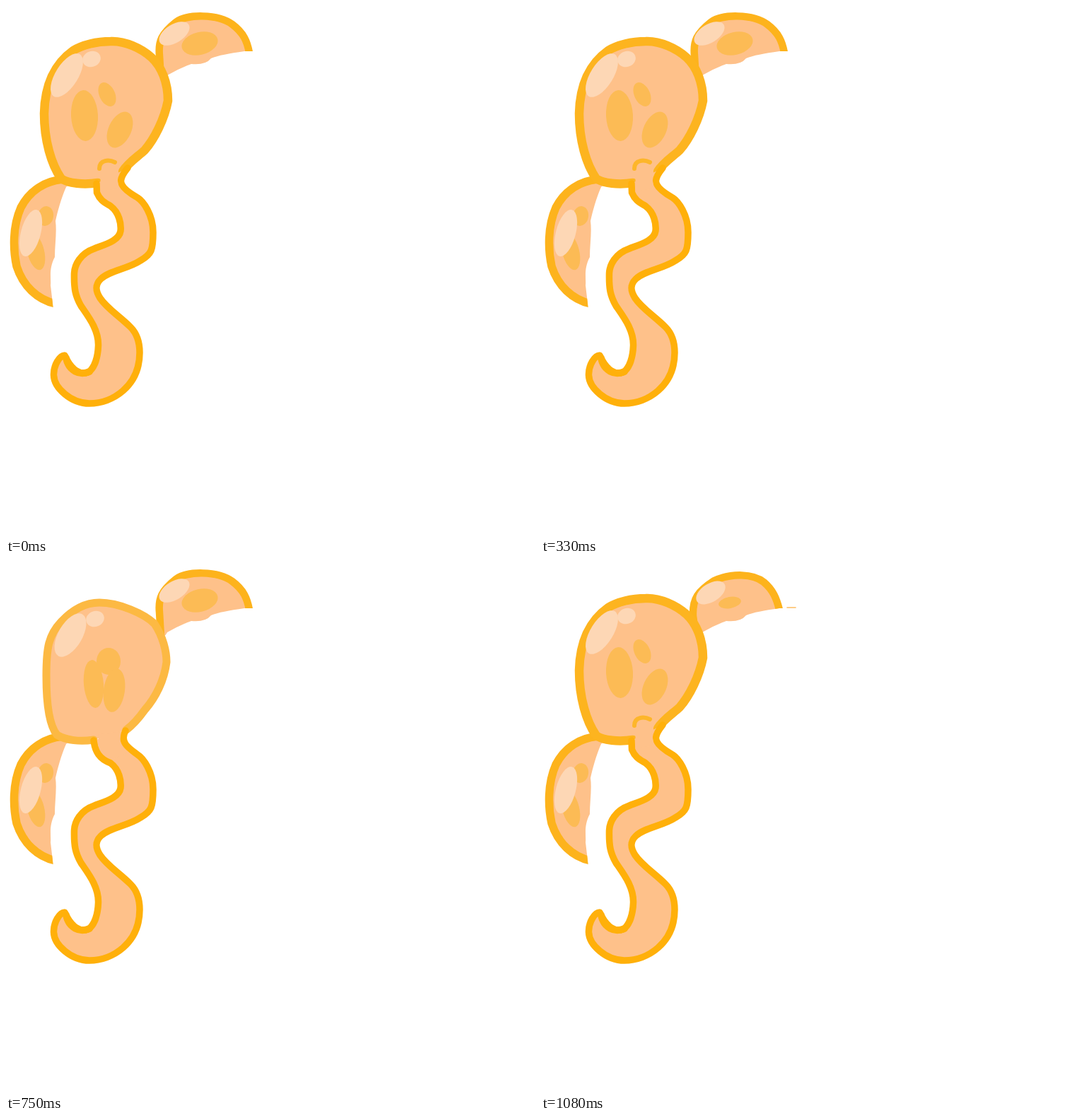
Write an HTML page that moves like this. It is 748 px wide and 748 px high and loops after 1160 ms.

```html
<!DOCTYPE html>
<html>
<head>
<meta charset="utf-8">
<style>
  html, body { margin: 0; width: 100%; height: 100%; overflow: hidden; background: #fff; }
  svg { display: block; width: 100vw; height: 100vh; }
  path { stroke-linecap: round; stroke-linejoin: round; }
</style>
</head>
<body>
<svg viewBox="0 0 748 748">
  <defs>
    <clipPath id="wingCut">
      <path d="M180 -10 H370 V64 L337 64 C315 67 300 70 290 74 Q282 84 262 82 Q245 88 228 98 L223 106 H180Z"/>
    </clipPath>
    <clipPath id="sacCut">
      <path d="M-10 200 H92 V250 L85 256 C78 272 73 290 70 304 C72 320 69 338 69 355 C60 372 64 385 63 395 L65 412 L69 445 H-10Z"/>
    </clipPath>
  </defs>
  <g id="sac" clip-path="url(#sacCut)"></g>
  <g id="wing" clip-path="url(#wingCut)"></g>
  <g id="head"></g>
</svg>
<script>
const FLESH = '#fec18a', SPOT = '#fcbb55', SHINE = '#fdd7b5';
const LOOP = 1160;

// Blends two paths, or two lists of ellipses, of the same structure.
const mix = (a, b, t) => a + (b - a) * t;
function mixPath(a, b, t) {
  const to = b.match(/-?[\d.]+/g);
  let i = 0;
  return a.replace(/-?[\d.]+/g, n => mix(+n, +to[i++], t).toFixed(2));
}
const blend = (a, b, t) => ({
  d: mixPath(a.d, b.d, t),
  spots: a.spots.map((e, i) => e.map((n, j) => mix(n, b.spots[i][j], t))),
  shines: a.shines.map((e, i) => e.map((n, j) => mix(n, b.shines[i][j], t)))
});

const path = (d, fill, stroke = 'none', width = 0) =>
  `<path d="${d}" fill="${fill}" stroke="${stroke}" stroke-width="${width}"/>`;
const ellipse = fill => ([x, y, rx, ry, turn]) =>
  `<ellipse rx="${rx}" ry="${ry}" fill="${fill}" transform="translate(${x} ${y}) rotate(${turn})"/>`;
const marks = p => p.spots.map(ellipse(SPOT)).join('') + p.shines.map(ellipse(SHINE)).join('');

// Left sac
const sacRest = {
  d: 'M84 245 C55 246 33 262 21 285 C9 312 10 345 15 368 C24 396 44 415 70 421 L110 421 L110 245',
  spots: [[56, 297, 11, 14, 10], [42, 347, 12, 27, -14]],
  shines: [[35, 321, 14, 34, 15]]
};
const sacFull = {
  d: 'M84 239 C50 238 28 254 17 276 C6 300 6 330 9 356 C13 395 22 417 74 437 L110 437 L110 239',
  spots: [[49, 281, 11, 25, 25], [36, 355, 10, 27, -5]],
  shines: [[28, 318, 15, 33, 14]]
};
const drawSac = p => path(p.d, FLESH, '#fdb31c', 11.5) + marks(p);

// Upper right wing
const wingRest = {
  d: 'M219 104 L217 70 C215 50 220 39 240 23 C255 11 300 11 320 26 C336 38 341 50 344 66',
  spots: [[274, 53, 26, 16, -14]],
  shines: [[238, 39, 24, 13, -32]]
};
const wingFull = {
  d: 'M219 104 L215 70 C212 46 216 32 238 15 C256 2 308 2 328 18 C344 32 350 46 354 66',
  spots: [[280, 49, 30, 18, -14]],
  shines: [[236, 34, 25, 14, -32]]
};
const wingSmall = {
  d: 'M219 104 L215 75 C214 50 222 40 245 25 C270 14 300 15 315 27 C328 38 333 50 337 66',
  spots: [[267, 56, 16, 8, -10]],
  shines: [[240, 42, 23, 13, -32]]
};
const drawWing = p => path(p.d, FLESH, '#fdb31c', 10.5) + marks(p);
const speck = path('M348 63 H360', 'none', '#fdbd62', 1.6);

// Head with the tail below it
const tail = 'C160 292 163 308 162 318 C160 332 140 337 125 343 C105 350 97 366 96.5 378 ' +
  'C96 400 98 410 106 424 C117 440 131 458 130.5 480 C130 495 126 512 116 518 ' +
  'C104 522 92 514 83 494 C76 494 67 508 67.5 522 C68 540 92 562 118 562 ' +
  'C150 562 189 538 189 490 C189 475 184 462 176 454 C160 438 143 428 133 413 ' +
  'C126 402 126 394 134 386 C146 374 172 372 190 360 C206 351 208 345 208 320 ' +
  'C208 295 194 276 186 271 ';
const hook = path('M85 498 C89 516 104 523 118 517', 'none', '#ffb00a', 10);
const openNeck = path('M131 242 L130 258 L136 268 L150 278 L172 268 L160 257 L163 238Z', FLESH);
const cappedNeck =
  path('M133.5 262 V229 Q138 221 146 221 Q155 221 160 226 L157.5 245 L160 258Z', FLESH) +
  path('M132 230 C132 217 146 217 154 221', 'none', '#fdb62a', 6);

const headRest = {
  d: 'M130 250 C110 253 88 251 78 244 C64 224 54 190 54 152 C55 105 74 78 95 63 C108 55 128 50 148 50 ' +
    'C168 49 192 60 206 73 C220 86 229 108 229 134 C224 160 210 188 196 204 C185 214 172 222 165 234',
  spots: [[111, 155, 19, 36, -3], [143, 125, 11, 18, -25], [161, 175, 16, 27, 25]],
  shines: [[86, 98, 16, 35, 32], [121, 75, 13, 11, -20]],
  ink: '#fdb41f', width: 12.5, neck: cappedNeck,
  left: 'M128 251 L128.5 264 C133 275 140 278 148 283 ',
  right: 'C172 263 162 255 162.5 247 C163 240 168 234 172 229'
};
const headWide = {
  d: 'M124 254 C105 256 88 254 74 244 C60 220 50 190 49 155 C50 105 62 82 78 70 C96 54 112 47 134 47 ' +
    'C165 47 198 62 216 80 C230 92 236 112 236 134 C234 160 218 196 202 214 C190 232 178 240 167 248',
  spots: [[102, 158, 18, 42, 0], [155, 117, 12, 21, -35], [171, 183, 20, 27, 12]],
  shines: [[82, 94, 16, 34, 32], [117, 71, 13, 11, -20]],
  ink: '#fcb52b', width: 12.5, neck: openNeck,
  left: 'M124 253 C126 267 134 277 148 283 ',
  right: 'C176 265 170 260 167 252'
};
const headWidest = {
  ...headWide,
  d: 'M121 256 C100 261 82 259 68 248 C52 222 40 190 39 155 C41 108 54 78 74 62 C92 46 112 40 136 40 ' +
    'C170 40 204 56 224 76 C240 92 245 112 245 136 C242 164 226 200 208 220 C196 236 182 246 169 252',
  spots: [[97, 159, 19, 45, 0], [160, 113, 13, 23, -35], [177, 186, 21, 29, 12]],
  shines: [[75, 90, 17, 35, 32], [112, 66, 13, 11, -20]]
};
const headSmall = {
  d: 'M124 250 C105 253 85 251 72 243 C60 228 57 195 57 160 C57 120 60 102 78 83 C94 66 112 56 132 56 ' +
    'C160 56 196 72 210 86 C222 104 227 125 227 140 C224 165 212 190 196 208 C186 222 178 230 170 236',
  spots: [[124, 171, 14, 34, -5], [145, 139, 17, 19, 0], [153, 180, 15, 31, 8]],
  shines: [[91, 102, 17, 34, 30], [126, 79, 13, 11, -20]],
  ink: '#fcb943', width: 11, neck: openNeck,
  left: 'M124 251 C126 267 132 277 148 283 ',
  right: 'C174 262 160 254 169 237'
};
const drawHead = p =>
  path(p.d, FLESH, p.ink, p.width) +
  path(p.left + tail + p.right, FLESH, '#ffb00a', 9.5) +
  hook + p.neck + marks(p);

// Each part: [start in ms, drawing]
const parts = {
  sac: [
    [0, drawSac(sacRest)],
    [80, drawSac(blend(sacRest, sacFull, 0.5))],
    [170, drawSac(sacFull)],
    [250, drawSac(blend(sacRest, sacFull, -0.35))],
    [330, drawSac(sacRest)]
  ],
  head: [
    [0, drawHead(headRest)],
    [580, drawHead(headWide)],
    [670, drawHead(headWidest)],
    [750, drawHead(headSmall)],
    [830, drawHead(headRest)]
  ],
  wing: [
    [0, drawWing(wingRest)],
    [920, drawWing(blend(wingRest, wingFull, 0.5))],
    [1000, drawWing(wingFull)],
    [1080, drawWing(wingSmall) + speck]
  ]
};

const shown = {};
function render(now) {
  const t = now % LOOP;
  for (const id in parts) {
    const step = parts[id].filter(s => s[0] <= t).pop();
    if (shown[id] === step) continue;
    shown[id] = step;
    document.getElementById(id).innerHTML = step[1];
  }
}
const start = performance.now();
function tick() {
  render(performance.now() - start);
  requestAnimationFrame(tick);
}
tick();
</script>
</body>
</html>
```
